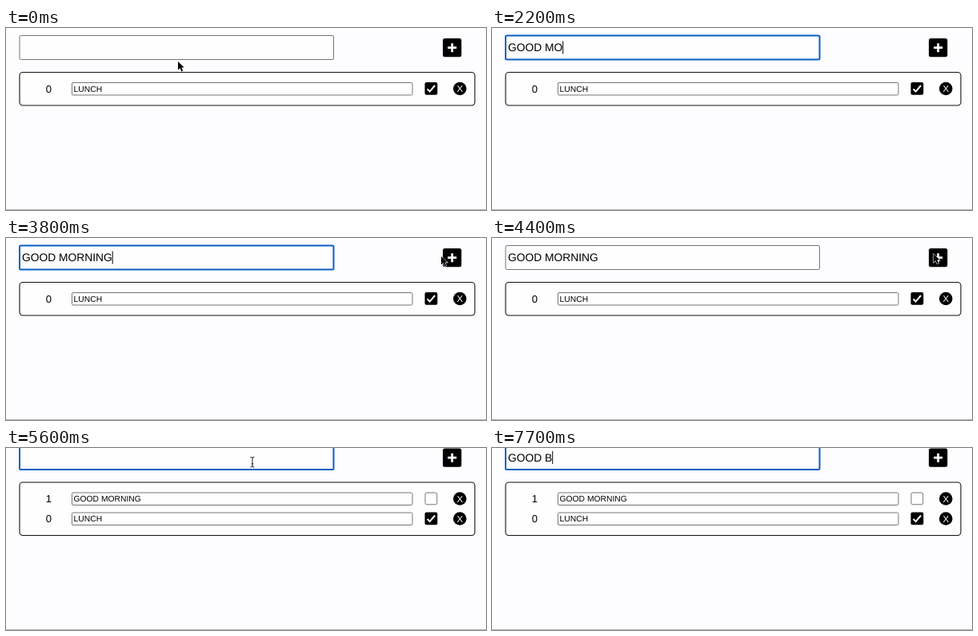
Recreate the animation shown at these times as an HTML page. Size 600 by 228 pixels, loop 8 s.

```html
<!DOCTYPE html>
<html lang="en">
<head>
<meta charset="utf-8">
<title>To-do list</title>
<style>
  html, body { margin: 0; width: 100%; height: 100%; overflow: hidden; background: #fdfcfe; }
  svg { display: block; width: 600px; height: 228px; }
  text { font-family: "Liberation Sans", Arial, sans-serif; white-space: pre; text-rendering: geometricPrecision; }
  .field { fill: #fefefe; stroke: #767676; stroke-width: 1; }
  .small { font-size: 10.3px; }
  .num { font-size: 13px; text-anchor: middle; }
  .x { font-size: 11.5px; text-anchor: middle; fill: #fff; }
</style>
</head>
<body>
<svg viewBox="0 0 600 228">
  <defs>
    <g id="row">
      <rect class="field" x="82.5" y="68.5" width="425.5" height="15.5" rx="1.5"/>
      <circle cx="567.3" cy="76" r="8.3"/>
      <text class="x" x="567.3" y="80.1">X</text>
    </g>
  </defs>
  <g id="page">
    <rect id="input" class="field" x="17" y="9.5" width="392.5" height="30" rx="1.5"/>
    <text id="typed" x="20" y="29.3" font-size="13.8"></text>
    <rect id="caret" y="16.5" width="1" height="16"/>
    <rect x="546" y="13" width="23.3" height="23.3" rx="2.5"/>
    <path d="M557.7 19.2v11M552.2 24.7h11" stroke="#fff" stroke-width="2.8"/>
    <rect id="card" x="17" y="55.5" width="569" height="41.5" rx="4" fill="#fefefe" stroke="#111" stroke-width="1.1"/>
    <g id="added">
      <use href="#row"/>
      <text class="num" x="53.3" y="80.7">1</text>
      <text class="small" x="84.6" y="79.6">GOOD MORNING</text>
      <rect class="field" x="524" y="68.5" width="14.8" height="14.8" rx="2"/>
    </g>
    <g id="lunch">
      <use href="#row"/>
      <text class="num" x="53.3" y="80.7">0</text>
      <text class="small" x="84.6" y="79.6">LUNCH</text>
      <rect x="523.5" y="68" width="15.8" height="15.8" rx="2"/>
      <path d="M526.6 76.4l3.1 3.2l6.4 -7.6" fill="none" stroke="#fff" stroke-width="2"/>
    </g>
  </g>
  <path d="M0 227.5H600" stroke="#b4b4b4"/>
  <path id="arrow" d="M0 0V10.6L2.5 8.3L4.3 12.4L6.2 11.6L4.4 7.6H7.7Z" stroke="#fff" stroke-width="1.1" paint-order="stroke"/>
  <path id="beam" d="M-2.5 -6.5Q0 -6.5 0 -4.5Q0 -6.5 2.5 -6.5M0 -4.5V4.5M-2.5 6.5Q0 6.5 0 4.5Q0 6.5 2.5 6.5M-1.3 2.2H1.3" fill="none" stroke="#222"/>
</svg>
<script>
const LOOP = 8000, STEP = 100, BLINK = 500, ADD = 4600, SCROLL = 12.5, PITCH = 25;
const typing = [
  { focus: 200, blur: 3900, clear: ADD, text: "GOOD MORNING",
    keys: [900, 1100, 1200, 1400, 1800, 2000, 2200, 2300, 2500, 2600, 2700, 2800] },
  { focus: 5100, blur: LOOP, clear: LOOP, text: "GOOD B",
    keys: [6600, 6700, 6800, 7000, 7500, 7700] }
];
// time, x, y of the pointer
const path = [
  [0, 215, 42], [100, 214, 36], [300, 207, 21], [400, 207, 20], [3000, 207, 20],
  [3200, 422, 15], [3500, 490, 5], [3800, 544, 23], [4200, 544, 23],
  [4400, 552, 20], [ADD, 552, 20], [5000, 308, 17.7], [LOOP, 308, 17.7]
];
const $ = id => document.getElementById(id);
const show = (id, on) => $(id).setAttribute("visibility", on ? "visible" : "hidden");
const move = (id, x, y) => $(id).setAttribute("transform", `translate(${x} ${y})`);

function pointer(t) {
  const i = path.findIndex(p => p[0] > t);
  const [t0, x0, y0] = path[i - 1], [t1, x1, y1] = path[i];
  const k = (t - t0) / (t1 - t0);
  return [x0 + (x1 - x0) * k, y0 + (y1 - y0) * k];
}

function drawInput(t) {
  const { focus, blur, clear, text, keys } = typing[t < ADD ? 0 : 1];
  const pressed = keys.filter(k => k <= t);
  const focused = t >= focus && t < blur;
  const last = pressed.at(-1) ?? focus;
  $("typed").textContent = t < clear ? text.slice(0, pressed.length) : "";
  $("input").style.cssText = focused ? "stroke:#0b5fc4;stroke-width:2" : "";
  $("caret").setAttribute("x", 20 + (pressed.length ? $("typed").getComputedTextLength() : 0));
  show("caret", focused && Math.floor((t - last) / BLINK) % 2 === 0);
}

function drawPointer(t, top) {
  const [x, y] = pointer(t);
  const visible = !(t >= 900 && t < 3000) && t < 6600;
  const inside = x > 17 && x < 410 && y > 9 - top && y < 40 - top;
  move("arrow", x, y);
  move("beam", x, y);
  show("arrow", visible && !inside);
  show("beam", visible && inside);
}

function draw(now) {
  const t = Math.floor(now % LOOP / STEP) * STEP;
  const added = t >= ADD, top = added ? SCROLL : 0;
  move("page", 0, -top);
  show("added", added);
  move("lunch", 0, added ? PITCH : 0);
  $("card").setAttribute("height", 41.5 + (added ? PITCH : 0));
  drawInput(t);
  drawPointer(t, top);
}

const start = performance.now();
function tick() {
  draw(performance.now() - start);
  requestAnimationFrame(tick);
}
tick();
</script>
</body>
</html>
```
